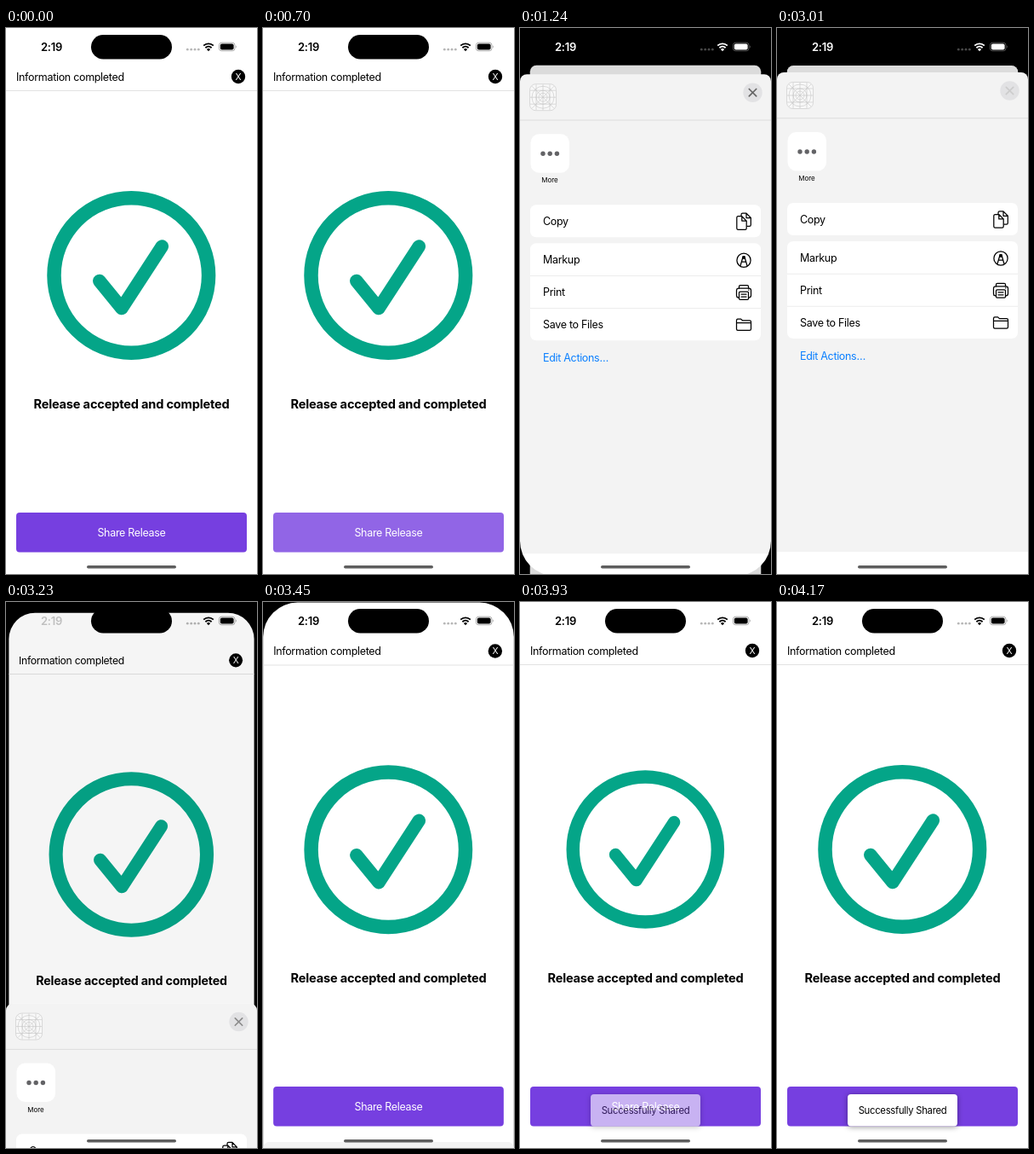
Animation of 295 by 640 pixels, one loop 5510 ms. Source, as an HTML page:

```html
<!DOCTYPE html>
<html lang="en">
<head>
<meta charset="utf-8">
<title>Share sheet</title>
<style>
  html, body { margin: 0; width: 100%; height: 100%; overflow: hidden; background: #000; }
  svg { display: block; width: 100%; height: 100%; }
  text { font: 12.5px Inter, "Liberation Sans", sans-serif; letter-spacing: -.025em; }
  .mid { text-anchor: middle; }
  .headline { font-size: 14.6px; font-weight: 700; letter-spacing: -.013em; }
  .clock { font-size: 13px; font-weight: 600; letter-spacing: -.02em; }
  .small { font-size: 8px; letter-spacing: 0; }
  .line { fill: none; stroke: #000; stroke-width: 1.25; stroke-linecap: round; stroke-linejoin: round; }
  .toast { filter: drop-shadow(0 1px 3px #0006); }
</style>
</head>
<body>
<svg viewBox="0 0 295 640">
  <rect width="295" height="640"/>

  <g id="page">
    <rect class="card" width="295" height="700" fill="#fff"/>
    <text x="12" y="61.5">Information completed</text>
    <circle cx="273" cy="57" r="8.2"/>
    <text class="mid" x="273" y="60.8" fill="#fff" style="font-size:10.5px">X</text>
    <path d="M0 73.5H295" stroke="#e2e2e2"/>
    <g id="badge" fill="none" stroke="#04a588">
      <circle cx="147.3" cy="290" r="90.8" stroke-width="16.5"/>
      <path d="M109.8 296.5L136 328.5L183.3 256" stroke-width="15.5" stroke-linecap="round" stroke-linejoin="round"/>
    </g>
    <text class="mid headline" x="147.5" y="446.3">Release accepted and completed</text>
    <g id="button">
      <rect x="12" y="568" width="271" height="46.5" rx="4" fill="#763fe0"/>
      <text class="mid" x="147.5" y="596" fill="#fff">Share Release</text>
    </g>
    <rect id="dim" class="card" width="295" height="700"/>
  </g>

  <g id="toast">
    <rect class="toast" x="83" y="577" width="129" height="37.5" rx="4" fill="#fff"/>
    <text class="mid" x="147.5" y="599.6" style="font-size:11.3px">Successfully Shared</text>
  </g>

  <g id="sheet">
    <clipPath id="sheetClip">
      <rect width="295" height="60" rx="8"/>
      <rect id="sheetBody" y="20" width="295" height="568"/>
    </clipPath>
    <g clip-path="url(#sheetClip)">
      <rect width="295" height="588" fill="#fff"/>
      <rect width="295" height="562" fill="#f3f3f3"/>
      <g transform="translate(27 27)" fill="none" stroke="#c4c4c4" stroke-width=".6">
        <rect x="-15.5" y="-15.5" width="31" height="31" rx="7" fill="#f8f8f8"/>
        <circle r="13"/><circle r="8"/><circle r="5"/>
        <path d="M-15 0H15M0 -15V15M-15 -8H15M-15 8H15M-8 -15V15M8 -15V15M-13 -13L13 13M13 -13L-13 13"/>
      </g>
      <circle cx="273.5" cy="21.5" r="11.2" fill="#e2e2e4"/>
      <path id="close" d="M269.3 17.3l8.4 8.4m0-8.4l-8.4 8.4" stroke-width="1.7" stroke-linecap="round"/>
      <path d="M0 53.8H295" stroke="#dcdcdc"/>
      <g id="content">
        <rect x="12.5" y="70" width="45.5" height="45.5" rx="10" fill="#fff"/>
        <g fill="#636366"><circle cx="27" cy="93" r="2.7"/><circle cx="35.2" cy="93" r="2.7"/><circle cx="43.4" cy="93" r="2.7"/></g>
        <text class="mid small" x="35" y="127">More</text>
        <g fill="#fff">
          <rect x="12" y="153" width="271" height="38" rx="7"/>
          <rect x="12" y="198" width="271" height="114" rx="7"/>
        </g>
        <path d="M12 236.3H283M12 274.3H283" stroke="#e8e8e8" stroke-width=".8"/>
        <text x="27" y="177">Copy</text>
        <text x="27" y="222">Markup</text>
        <text x="27" y="260">Print</text>
        <text x="27" y="298">Save to Files</text>
        <text x="27" y="336.5" fill="#0a7fff">Edit Actions…</text>
        <g class="line">
          <g transform="translate(263 172.5)">
            <path d="M-3 -6V-8Q-3 -9.6 -1.4 -9.6H3L8.3 -4.2V4Q8.3 5.6 6.7 5.6H4M3 -9.6V-4.2H8.3"/>
            <path d="M-6.6 -6H-2.2L3.2 -.6V8Q3.2 9.6 1.6 9.6H-6.6Q-8.2 9.6 -8.2 8V-4.4Q-8.2 -6 -6.6 -6ZM-2.2 -6V-.6H3.2" fill="#fff"/>
          </g>
          <g transform="translate(263 218)">
            <circle r="8.1"/>
            <path d="M-4 6.5L-.8 -4.5H.8L4 6.5M-2.6 2H2.6"/>
            <path d="M-.8 -4.5H.8L1.3 -2H-1.3Z" fill="#000"/>
          </g>
          <g transform="translate(263 255.8)">
            <path d="M-5.5 -5V-7Q-5.5 -8.4 -4.1 -8.4H4.1Q5.5 -8.4 5.5 -7V-5"/>
            <rect x="-8.5" y="-5" width="17" height="11" rx="2.4"/>
            <rect x="-5.5" y="-1" width="11" height="9.4" rx="1.2" fill="#fff"/>
            <path d="M-3 2H3M-3 5H3M5.6 -3H6"/>
          </g>
          <path transform="translate(263 293.5)" d="M-8.5 -2.2H8.5M-8.5 -5Q-8.5 -6.6 -6.9 -6.6H-3.4L-1.6 -4.9H6.9Q8.5 -4.9 8.5 -3.3V5Q8.5 6.6 6.9 6.6H-6.9Q-8.5 6.6 -8.5 5Z"/>
        </g>
      </g>
    </g>
  </g>

  <text id="clock" class="clock" x="41" y="26.7">2:19</text>
  <g id="icons">
    <g opacity=".28"><circle cx="213.3" cy="25.2" r="1.4"/><circle cx="217.7" cy="25.2" r="1.4"/><circle cx="222" cy="25.2" r="1.4"/><circle cx="226.3" cy="25.2" r="1.4"/></g>
    <path d="M232.2 20.6a8.6 8.6 0 0 1 11.6 0M234.4 23.2a5.4 5.4 0 0 1 7.2 0" fill="none" stroke="currentColor" stroke-width="1.9"/>
    <path d="M235.9 25a3.2 3.2 0 0 1 4.2 0L238 27.2Z"/>
    <rect x="250.4" y="17.2" width="18.6" height="9.6" rx="3" fill="none" stroke="currentColor" stroke-width=".8" opacity=".4"/>
    <rect x="251.8" y="18.6" width="15.8" height="6.8" rx="1.9"/>
    <path d="M270 20.3q1.5 1.7 0 3.4z" opacity=".45"/>
  </g>
  <rect x="100" y="8" width="95" height="28.5" rx="14.25"/>
  <rect x="95" y="630" width="105" height="3.6" rx="1.8" fill="#5e5e5e"/>
</svg>

<script>
const LOOP = 5510;
// The screen refreshes only at these moments and holds in between.
const TICKS = [0, 700, 810, 910, 1020, 1130, 1240, 3010, 3120, 3230, 3340, 3450,
               3570, 3690, 3810, 3930, 4050, 4170];
const SHEET_TOP = 52, SHEET_TRAVEL = 588;
const OPEN_AT = 802, CLOSE_AT = 3089, PULSE_AT = 3570;

const el = id => document.getElementById(id);
const set = (id, name, value) => el(id).setAttribute(name, value);
const ramp = (t, from, to) => Math.min(1, Math.max(0, (t - from) / (to - from)));
const gray = k => { const v = Math.round(255 * k); return `rgb(${v},${v},${v})`; };

// Critically damped spring from 0 to 1.
function spring(ms) {
  const x = Math.max(0, ms) * 0.0177;
  return 1 - (1 + x) * Math.exp(-x);
}

function draw(t) {
  const p = spring(t - OPEN_AT) - spring(t - CLOSE_AT);
  const moving = p > 0.004;

  // Page shrinks back behind the sheet.
  const scale = 1 - 0.08 * p;
  set('page', 'transform', moving ? `translate(${147.5 * (1 - scale)} ${44 * p}) scale(${scale})` : '');
  for (const card of document.querySelectorAll('.card'))
    card.setAttribute('rx', moving ? 41 - 33 * p : 0);
  set('dim', 'opacity', 0.14 * p);
  set('button', 'opacity', 1 - 0.4 * (ramp(t, 650, 750) - ramp(t, 780, 950)));

  // Badge dips and recovers once the sheet is gone.
  const pulse = 1 - 0.078 * Math.sin(Math.PI * ramp(t, PULSE_AT, PULSE_AT + 600) ** 0.7);
  set('badge', 'transform', `translate(147.3 290) scale(${pulse}) translate(-147.3 -290)`);
  set('toast', 'opacity', ramp(t, 3750, 4050));

  set('sheet', 'transform', `translate(0 ${SHEET_TOP + SHEET_TRAVEL * (1 - p)})`);
  set('sheet', 'visibility', moving ? 'visible' : 'hidden');
  set('sheetBody', 'rx', t < 3000 ? 41 : 0);
  set('sheetBody', 'y', t < 3000 ? -60 : 20);
  set('sheetBody', 'height', t < 3000 ? 648 : 568);
  // The tall rounded body must not rise above the sheet's own top edge.
  el('sheet').style.clipPath = 'none';
  set('content', 'opacity', ramp(t, 870, 1070));
  set('close', 'stroke', gray(t < 3000 ? 0.4 : 0.8 - 0.25 * ramp(t, 3010, 3230)));

  const lit = ramp(t, 870, 1070);
  set('clock', 'fill', gray(lit - ramp(t, 3180, 3380)));
  const iconColor = gray(lit - ramp(t, 3100, 3200));
  set('icons', 'fill', iconColor);
  set('icons', 'color', iconColor);
}

// Cut the sheet's body where its top corners begin.
const topCut = document.createElementNS('http://www.w3.org/2000/svg', 'clipPath');
topCut.id = 'topCut';
topCut.innerHTML = '<rect y="20" width="295" height="600"/>';
document.querySelector('svg').append(topCut);
set('sheetBody', 'clip-path', 'url(#topCut)');

const start = performance.now();
function frame() {
  const t = (performance.now() - start) % LOOP;
  draw(TICKS.findLast(tick => tick <= t));
  requestAnimationFrame(frame);
}
frame();
</script>
</body>
</html>
```
